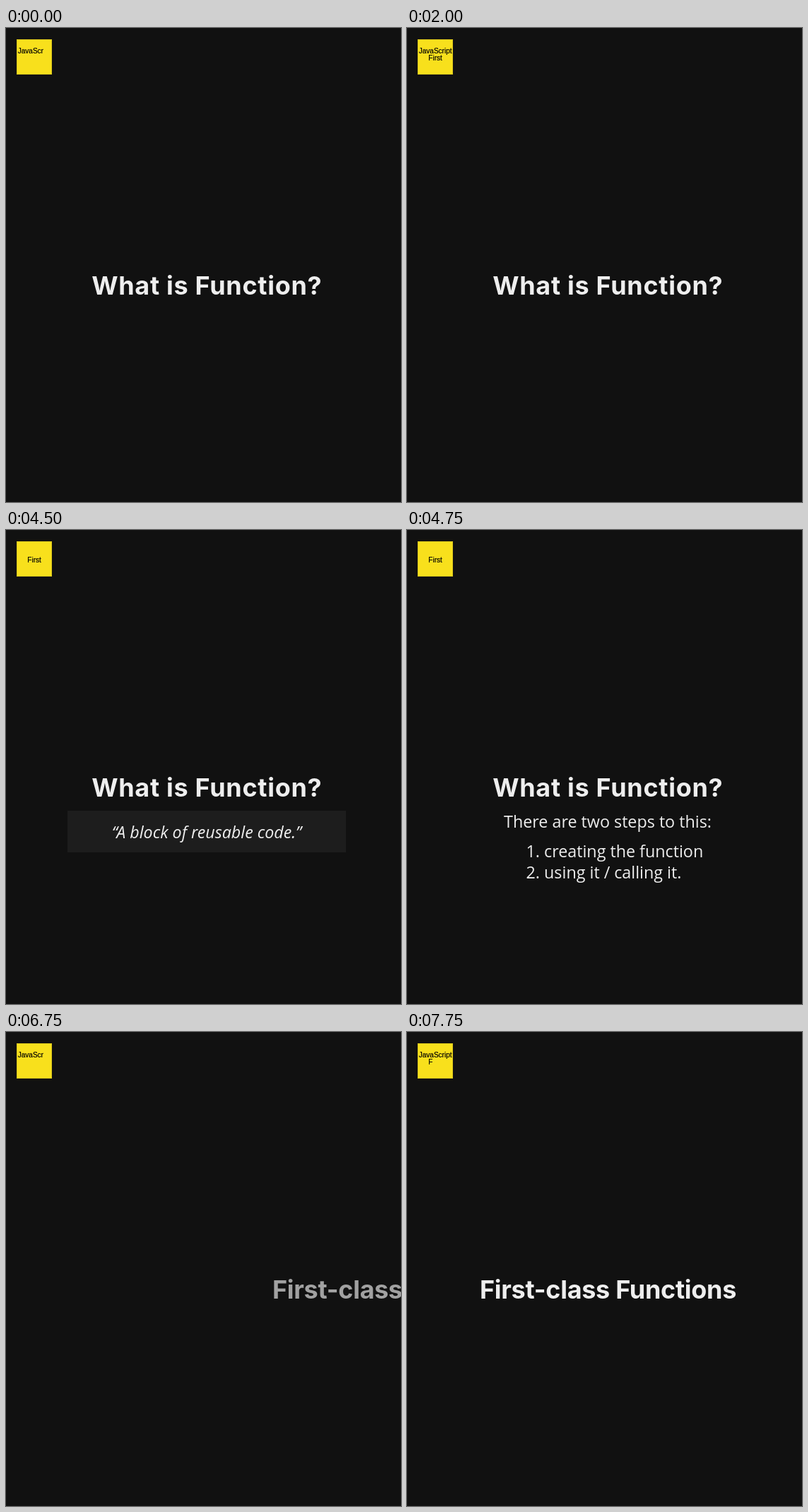
These frames come from a looping animation (559 by 672 pixels, 8 s). An HTML page:

```html
<!DOCTYPE html>
<html lang="en">
<head>
<meta charset="utf-8">
<title>What is Function?</title>
<style>
  html, body { margin: 0; width: 100%; height: 100%; overflow: hidden; background: #111; }
  svg { display: block; width: 559px; height: 672px; }
  text { white-space: pre; }
  .badge { font: 10px "Liberation Sans", Arial, sans-serif; fill: #000; stroke: #000; stroke-width: 0.2px; }
  .title { font: 700 36px Inter, sans-serif; fill: #eee; text-anchor: middle; }
  .body { font: 23.3px "Open Sans", sans-serif; fill: #eee; }
  .mid { text-anchor: middle; }
  .quote { font-style: italic; }
  #first { letter-spacing: 0.7px; }
  #next { letter-spacing: -0.3px; }
</style>
</head>
<body>
<svg viewBox="0 0 559 672">
  <rect width="559" height="672" fill="#111"/>
  <rect x="15.5" y="16.5" width="49" height="49" fill="#f8e01c" stroke="#dcc71b"/>
  <text id="line1" class="badge" x="16.8" y="36"></text>
  <text id="line2" class="badge" x="30.3" y="46"></text>

  <text id="first" class="title" x="284.3" y="378">What is Function?</text>
  <text id="next" class="title" x="284.5" y="378">First-class Functions</text>

  <g id="quote">
    <rect x="87" y="398" width="394" height="59" fill="#1d1d1d"/>
    <text class="body mid quote" x="284" y="436.5">“A block of reusable code.”</text>
  </g>
  <g id="steps">
    <text class="body mid" x="284" y="422">There are two steps to this:</text>
    <text class="body" x="168.5" y="463.7">1. creating the function</text>
    <text class="body" x="168.5" y="494">2. using it / calling it.</text>
  </g>
</svg>
<script>
  const LOOP = 8000, TICK = 250;
  const KEY_TIME = 260;                      // ms per typed letter
  const TYPE_A = -1920, TYPE_B = 4705;       // the two typing runs begin
  const CLEAR_1 = 4500, CLEAR_2 = 6500;      // each badge line is wiped
  const PEEK = 1500, QUOTE = 2750, STEPS = 4750, NEXT = 6750;
  const SLIDE_TIME = 750, SLIDE_FROM = 274, FADE = 0.35;

  const el = id => document.getElementById(id);
  const show = (id, on) => el(id).setAttribute("visibility", on ? "visible" : "hidden");
  const within = (t, from, to) => t >= from && t < to;

  // Letters of a word typed by time t, after `skip` earlier letters.
  function typed(word, t, wipe, skip) {
    const start = t < wipe ? TYPE_A : TYPE_B;
    const count = Math.floor((t - start) / KEY_TIME) - skip;
    return word.slice(0, Math.max(0, count));
  }

  function draw(t) {
    el("line1").textContent = typed("JavaScript", t, CLEAR_1, 0);
    el("line2").textContent = typed("First", t, CLEAR_2, "JavaScript".length);

    show("first", t < NEXT);
    show("quote", within(t, PEEK, PEEK + TICK) || within(t, QUOTE, STEPS));
    show("steps", within(t, STEPS, NEXT));
    show("next", t >= NEXT);

    const rest = Math.max(0, 1 - (t - NEXT) / SLIDE_TIME);
    const ease = Math.min(1, rest ** 4.1);
    el("next").setAttribute("transform", `translate(${SLIDE_FROM * ease} 0)`);
    el("next").setAttribute("opacity", 1 - FADE * ease);
  }

  const begin = performance.now();
  function tick() {
    const t = (performance.now() - begin) % LOOP;
    draw(Math.floor(t / TICK) * TICK);
    requestAnimationFrame(tick);
  }
  tick();
</script>
</body>
</html>
```
